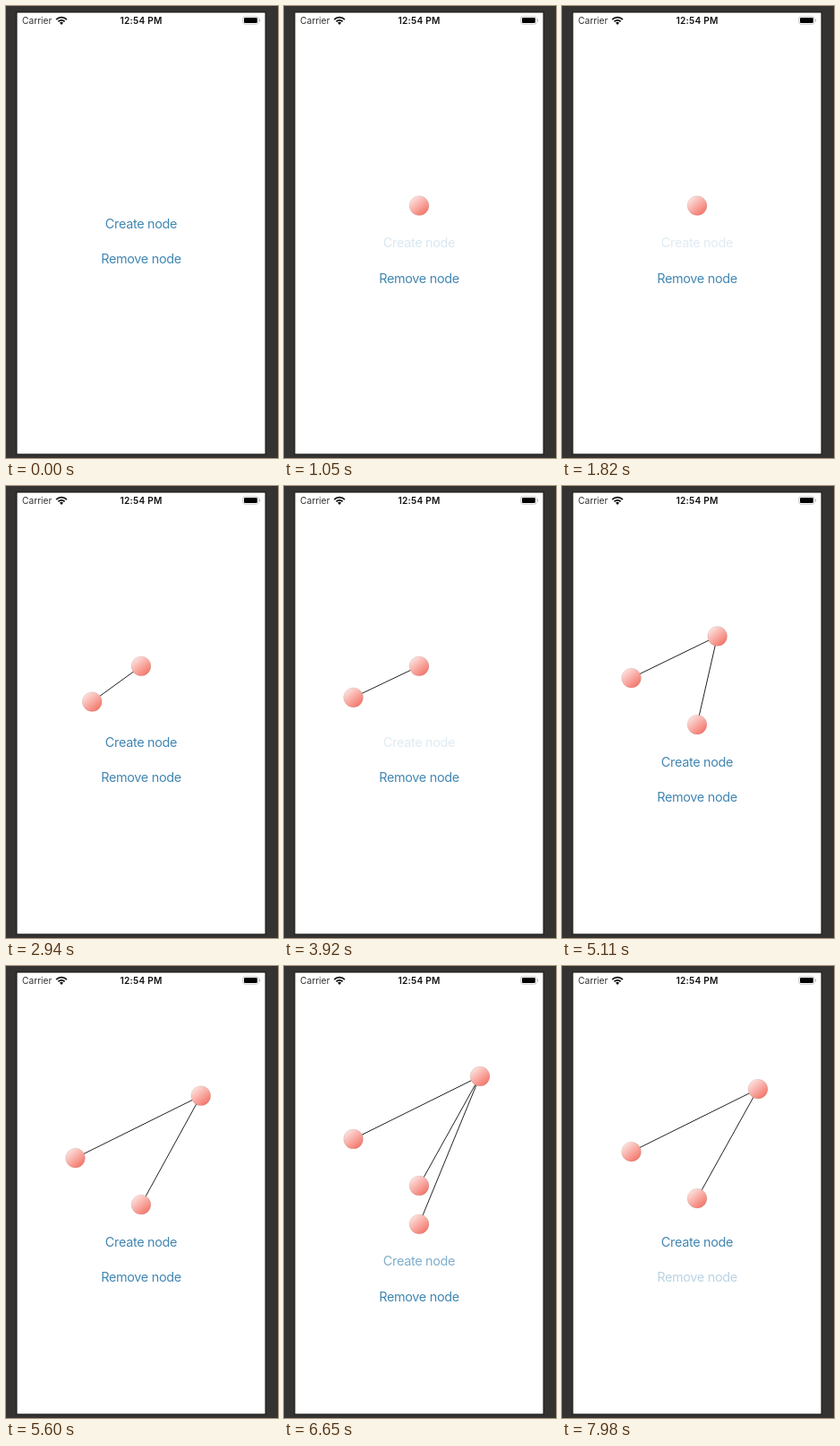
These frames come from a looping animation (304x504 px, 8000 ms). An HTML page with a canvas:

```html
<!DOCTYPE html>
<html lang="en">
<head>
<meta charset="utf-8">
<title>Node graph</title>
<style>
html, body { margin: 0; width: 100%; height: 100%; overflow: hidden; background: #353331; }
canvas { display: block; width: 304px; height: 504px; }
</style>
</head>
<body>
<canvas id="stage"></canvas>
<script>
const W = 304, H = 504, LOOP = 8000;
const MID_X = 151, MID_Y = 222.6, GAP = 43.5, RADIUS = 10.9;
const FONT = 'Inter, "Liberation Sans", sans-serif';

const canvas = document.getElementById('stage');
const ctx = canvas.getContext('2d');
const ratio = window.devicePixelRatio || 1;
canvas.width = W * ratio;
canvas.height = H * ratio;

// Each tap dims its button while held; release changes the node count.
const taps = [
  { label: 'Create', press: 975, release: 1045, count: 1 },
  { label: 'Create', press: 1815, release: 1955, count: 2 },
  { label: 'Create', press: 3915, release: 3985, count: 3 },
  { label: 'Create', press: 6295, release: 6505, count: 4 },
  { label: 'Remove', press: 7835, release: 7905, count: 3 }
];

const clamp = v => Math.max(0, Math.min(1, v));
const mix = (a, b, k) => a + (b - a) * k;
const smooth = k => k * k * (3 - 2 * k);
const easeOut = (k, power) => 1 - Math.pow(1 - clamp(k), power);

function dragOffset(index, t) {
  if (index === 0) {
    const k = easeOut((t - 5010) / 800, 3);
    return [68 * k, -35 * k];
  }
  if (index === 1) {
    const u = (t - 2765) / 595;
    return [-73.5 * easeOut(u, 3.9), -8.5 * easeOut(u, 1.7)];
  }
  return [0, 0];
}

function layout(t) {
  let before = 0, count = 0, since = 0;
  for (const tap of taps) {
    if (t < tap.release) break;
    before = count;
    count = tap.count;
    since = tap.release;
  }
  const size = mix(before, count, easeOut((t - since) / 175, 2));
  const nodes = Array.from({ length: count }, (_, i) => {
    const [dx, dy] = dragOffset(i, t);
    const rows = i < before ? size : count;
    return { x: MID_X + dx, y: MID_Y + (i - (rows - 1) / 2) * GAP + dy };
  });
  return { count, nodes };
}

function buttonAlpha(label, t) {
  let alpha = 1;
  for (const tap of taps) {
    if (tap.label !== label || t < tap.press) continue;
    alpha = t < tap.release ? 0.17 : mix(0.2, 1, smooth(clamp((t - tap.release) / 260)));
  }
  return alpha;
}

function text(str, x, y, font, color, spacing = 0, align = 'center') {
  ctx.font = `${font} ${FONT}`;
  ctx.letterSpacing = spacing + 'px';
  ctx.textAlign = align;
  ctx.fillStyle = color;
  ctx.fillText(str, x, y);
}

function roundBox(x, y, w, h, r) {
  ctx.beginPath();
  ctx.roundRect(x, y, w, h, r);
}

function drawWifi(x, y) {
  ctx.strokeStyle = '#111';
  ctx.lineWidth = 1.8;
  for (const r of [5.1, 8.3]) {
    ctx.beginPath();
    ctx.arc(x, y, r, -Math.PI * 0.75, -Math.PI * 0.25);
    ctx.stroke();
  }
  ctx.fillStyle = '#111';
  ctx.beginPath();
  ctx.moveTo(x, y);
  ctx.arc(x, y, 2.9, -Math.PI * 0.75, -Math.PI * 0.25);
  ctx.fill();
}

function drawBattery() {
  ctx.strokeStyle = '#bdbdbd';
  ctx.lineWidth = 0.8;
  roundBox(264.7, 11.7, 17.4, 8.6, 2.4);
  ctx.stroke();
  ctx.fillStyle = '#000';
  roundBox(266, 13, 14.8, 6, 1.3);
  ctx.fill();
  ctx.fillStyle = '#bdbdbd';
  roundBox(283, 14.6, 1.1, 2.8, 0.5);
  ctx.fill();
}

function drawPhone() {
  ctx.fillStyle = '#353331';
  ctx.fillRect(0, 0, W, H);
  ctx.fillStyle = '#141414';
  ctx.fillRect(11.5, 6.5, 279, 493.8);
  ctx.fillStyle = '#fff';
  ctx.fillRect(12.5, 7.5, 277, 491.8);
  text('Carrier', 18, 20, '10.2px', '#333', 0, 'left');
  text('12:54 PM', MID_X, 20, '600 10.2px', '#111', 0.2);
  drawWifi(62, 20.9);
  drawBattery();
}

function drawNode({ x, y }) {
  const fill = ctx.createLinearGradient(x - 8, y - 9, x + 7, y + 9);
  fill.addColorStop(0, '#fde5e2');
  fill.addColorStop(1, '#f47468');
  ctx.fillStyle = fill;
  ctx.beginPath();
  ctx.arc(x, y, RADIUS, 0, Math.PI * 2);
  ctx.fill();
  ctx.strokeStyle = 'rgba(120, 90, 90, 0.18)';
  ctx.lineWidth = 0.8;
  ctx.stroke();
}

function drawEdge(a, b) {
  ctx.strokeStyle = '#222';
  ctx.lineWidth = 1;
  ctx.beginPath();
  ctx.moveTo(a.x, a.y);
  ctx.lineTo(b.x, b.y);
  ctx.stroke();
}

function drawButton(label, y, t) {
  ctx.globalAlpha = buttonAlpha(label, t);
  text(label + ' node', MID_X, y, '14.4px', '#4086b2', -0.3);
  ctx.globalAlpha = 1;
}

function draw(t) {
  ctx.setTransform(ratio, 0, 0, ratio, 0, 0);
  drawPhone();
  const { count, nodes } = layout(t);
  nodes.slice(1).forEach(node => drawEdge(nodes[0], node));
  nodes.forEach(drawNode);
  const y = 247.6 + count * 21.7;
  drawButton('Create', y, t);
  drawButton('Remove', y + 39.4, t);
}

const start = performance.now();
function tick() {
  draw((performance.now() - start) % LOOP);
  requestAnimationFrame(tick);
}
tick();
</script>
</body>
</html>
```
